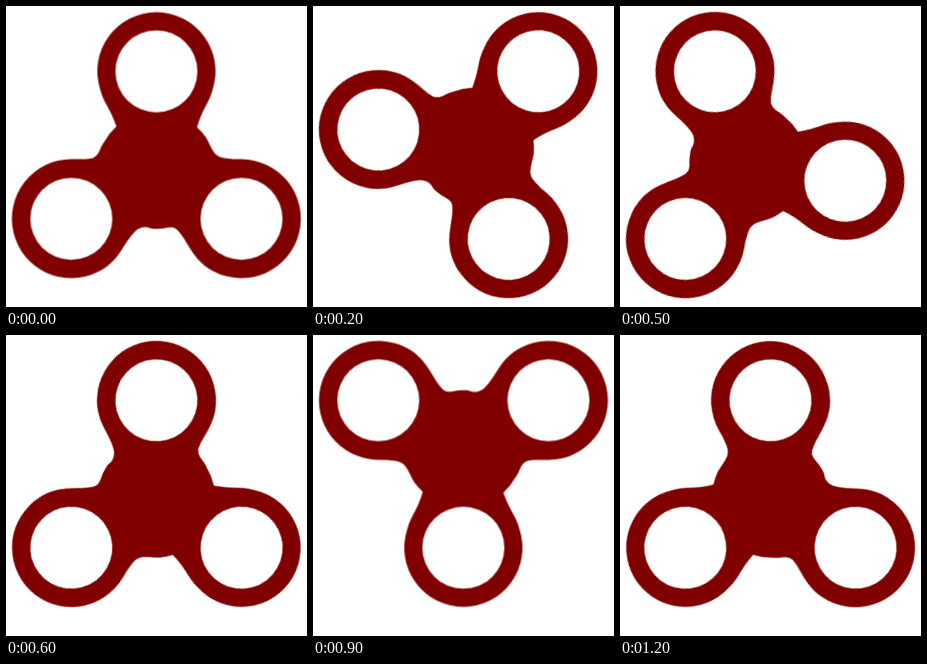
Write an HTML page that moves like this. It is 301 px wide and 301 px high and loops after 1250 ms.

```html
<!DOCTYPE html>
<html lang="en">
<head>
<meta charset="utf-8">
<title>Spinner</title>
<style>
  html, body { margin: 0; width: 100%; height: 100%; overflow: hidden; background: #fff; }
  svg { display: block; width: 100vw; height: 100vh; }
</style>
</head>
<body>
<svg viewBox="0 0 301 301">
  <g id="spinner">
    <path fill="#800000" d="
      M-40-43.2 C-46-61-53-67-56.2-80
      A59.1 59.1 0 1 1 56.2-80 C53-67 46-61 40.7-42.2
      A59 59 0 0 1 49-33 C55-24 56-13 68-11.5 C74-10.5 80-10.4 85.1-10.4
      A59.5 59.5 0 1 1 57.1 101.7 C38 92 32 74 24 64 C20 58.5 17 57 10 58.3
      A59.2 59.2 0 0 1-5 59 C-12 56.5-16 57.5-20.5 61 C-34 74-36 91-58 102.1
      A59.5 59.5 0 1 1-85.1-10.4 C-75-10.4-66-10-62-12.5 C-56-16.5-57-22-52-28
      A59 59 0 0 1-40-43.2Z"/>
    <g fill="#fff">
      <circle cy="-98.3" r="41"/>
      <circle cx="85.1" cy="49.15" r="41"/>
      <circle cx="-85.1" cy="49.15" r="41"/>
    </g>
  </g>
</svg>
<script>
  const STEPS = 25, STEP_MS = 50, TURN = 10;
  const REACH = 98.3;   // hub to hole centre
  const INSET = 65.3;   // nearest hole centre to the left and top edges

  // The spinner turns while its bounding box stays against the top left.
  function pose(deg) {
    const arms = [0, 120, 240].map(a => (a + deg) * Math.PI / 180);
    const x = INSET - REACH * Math.min(...arms.map(Math.sin));
    const y = INSET + REACH * Math.max(...arms.map(Math.cos));
    return `translate(${x.toFixed(2)}px, ${y.toFixed(2)}px) rotate(${deg}deg)`;
  }

  const frames = Array.from({ length: STEPS + 1 }, (_, i) => ({
    offset: i / STEPS,
    transform: pose(Math.min(i, STEPS - 1) * TURN),
    easing: 'steps(1, end)'
  }));

  document.getElementById('spinner').animate(frames, {
    duration: STEPS * STEP_MS,
    iterations: Infinity
  });
</script>
</body>
</html>
```
